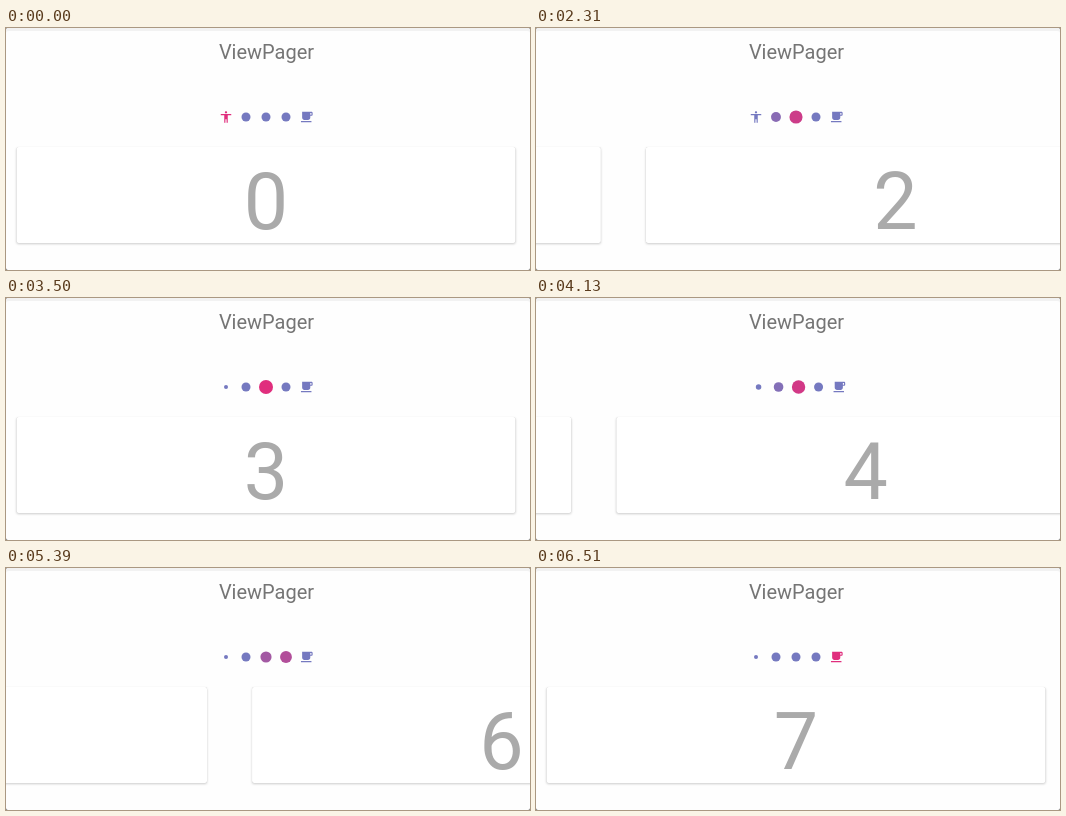
Recreate the animation shown at these times as an HTML page. Size 524 by 242 pixels, loop 7000 ms.

```html
<!DOCTYPE html>
<html lang="en">
<head>
<meta charset="utf-8">
<title>ViewPager</title>
<style>
  html, body { margin: 0; width: 100%; height: 100%; overflow: hidden; background: #666; }
  svg { display: block; width: 524px; height: 242px; border-radius: 2px; background: #fefefe; }
  text { font-family: Roboto, Arial, sans-serif; text-anchor: middle; }
  .title { font-size: 20px; fill: #757575; }
  .digit { font-size: 79px; fill: #aaa; }
  .card {
    fill: #fff;
    filter: drop-shadow(0 0 .6px rgba(0, 0, 0, .22)) drop-shadow(0 1px .8px rgba(0, 0, 0, .2));
  }
</style>
</head>
<body>
<svg viewBox="0 0 524 242">
  <path d="M0 0H524V5Q524 3 521 3H3Q0 3 0 5Z" fill="#f2f2f2"/>
  <text class="title" x="260.5" y="31">ViewPager</text>
  <g id="pages"></g>
  <g id="dots"></g>
</svg>
<script>
const LOOP = 7000, STEP = 70;
const PAGES = 8, PITCH = 544;
// Swipes: start and duration in ms
const SWIPES = [[1260, 560], [2030, 700], [2800, 700], [3850, 560], [4550, 560], [5250, 700], [6020, 490]];
const DRAG = 140, GRAB = 0.045, RELEASE = 0.567;

const SPACE = 20, NORMAL = 9, SELECTED = 14, SMALLEST = 4;
const FRAME = 4 * SPACE + SELECTED, LEFT = 213, MIDDLE = 89;
const SHRINK = (SPACE + (SELECTED - NORMAL) / 2) * 0.7;
const INDIGO = [117, 121, 192], PINK = [224, 46, 125];
const PERSON = "M12 2c1.1 0 2 .9 2 2s-.9 2-2 2-2-.9-2-2 .9-2 2-2zm9 7h-6v13h-2v-6h-2v6H9V9H3V7h18v2z";
const CUP = "M20 3H4v10c0 2.21 1.79 4 4 4h6c2.21 0 4-1.79 4-4v-3h2c1.11 0 2-.9 2-2V5c0-1.11-.89-2-2-2zm0 5h-2V5h2v3zM2 21h18v-2H2v2z";

const clamp = (v, lo, hi) => Math.min(hi, Math.max(lo, v));
const mix = (a, b, k) => a + (b - a) * k;

function add(parent, tag, attrs, text = "") {
  const el = document.createElementNS("http://www.w3.org/2000/svg", tag);
  for (const key in attrs) el.setAttribute(key, attrs[key]);
  el.textContent = text;
  return parent.appendChild(el);
}

const pagesRoot = document.getElementById("pages");
const dotsRoot = document.getElementById("dots");

const pages = Array.from({ length: PAGES }, (_, i) => {
  const page = add(pagesRoot, "g", {});
  add(page, "rect", { class: "card", x: 10.5, y: 119, width: 499, height: 96, rx: 2 });
  add(page, "text", { class: "digit", x: 260, y: 200.5 }, String(i));
  return page;
});
const dots = pages.map(() => add(dotsRoot, "circle", { cy: MIDDLE }));
const person = add(dotsRoot, "path", { d: PERSON });
const cup = add(dotsRoot, "path", { d: CUP });

// Finger drag, then a cubic settle
function swipe(t, length) {
  if (t < 0) return 0;
  if (t >= length) return 1;
  if (t < DRAG) return mix(GRAB, RELEASE, t / DRAG);
  return 1 - (1 - RELEASE) * ((length - t) / (length - DRAG)) ** 3;
}

function tint(k) {
  return `rgb(${INDIGO.map((c, i) => Math.round(mix(c, PINK[i], k))).join()})`;
}

function placeIcon(icon, x, color) {
  const s = 14 / 24;
  icon.setAttribute("transform", `translate(${x - 7} ${MIDDLE - 7}) scale(${s})`);
  icon.setAttribute("fill", color);
  icon.style.display = "";
}

function drawDots(pos) {
  const scroll = clamp(pos - 2, 0, PAGES - 5);
  const offset = i => SELECTED / 2 + (i - scroll) * SPACE;
  const shown = i => offset(i) >= 0 && offset(i) < FRAME;
  let last = PAGES - 1;
  while (!shown(last)) last--;
  person.style.display = "none";

  dots.forEach((dot, i) => {
    const d = offset(i), x = LEFT + d;
    const near = clamp(1 - Math.abs(i - pos), 0, 1);
    const color = tint(near);
    dot.style.display = "none";
    if (!shown(i)) return;
    if (i === 0) return placeIcon(person, x, color);
    if (i === last) return placeIcon(cup, x + 0.8, color);
    const size = mix(NORMAL, SELECTED, near);
    const edge = Math.min(1, d / SHRINK, (FRAME - d) / SHRINK);
    dot.setAttribute("cx", x);
    dot.setAttribute("r", Math.max(SMALLEST, size * edge) / 2);
    dot.setAttribute("fill", color);
    dot.style.display = "";
  });
}

function draw(time) {
  const t = Math.floor((time % LOOP) / STEP) * STEP;
  const pos = SWIPES.reduce((sum, [start, length]) => sum + swipe(t - start, length), 0);
  pages.forEach((page, i) => {
    page.setAttribute("transform", `translate(${(i - pos) * PITCH} 0)`);
    page.style.display = Math.abs(i - pos) < 1 ? "" : "none";
  });
  drawDots(pos);
}

const begin = performance.now();
function tick() {
  draw(performance.now() - begin);
  requestAnimationFrame(tick);
}
tick();
</script>
</body>
</html>
```
